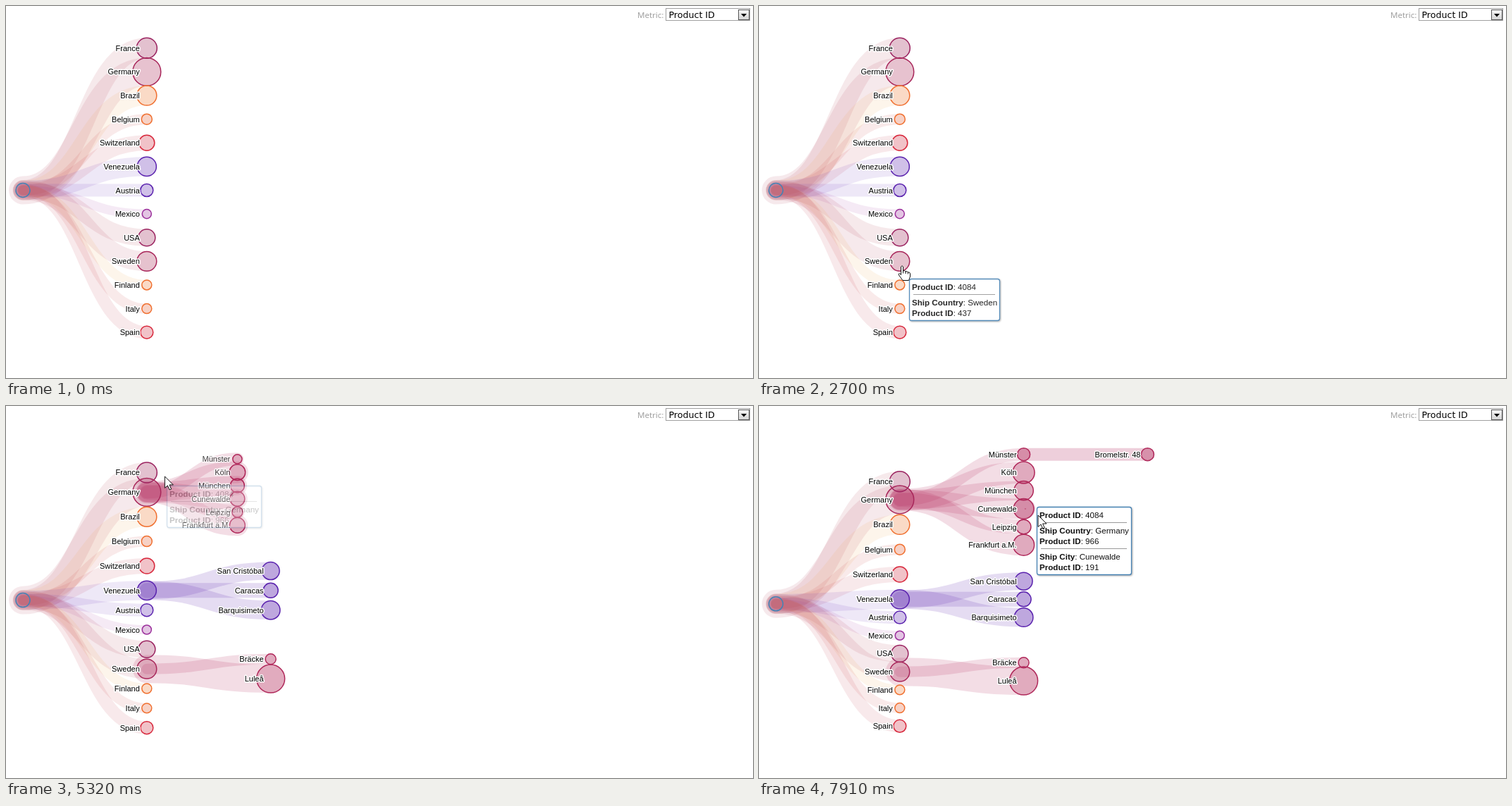
These frames come from a looping animation (1060 px wide and 528 px high, 8000 ms). An HTML page:

```html
<!DOCTYPE html>
<html lang="en">
<head>
<meta charset="utf-8">
<title>Weighted tree</title>
<style>
html, body { margin: 0; width: 100%; height: 100%; overflow: hidden; background: #fff; }
svg { display: block; }
.label { font: 11px "Liberation Sans", Arial, sans-serif; text-anchor: end;
  paint-order: stroke; stroke: #fff; stroke-width: 3px; stroke-linejoin: round; }
.tip text { font: 11.6px "Liberation Sans", Arial, sans-serif; fill: #111; }
.tip tspan { font-weight: bold; }
.tip rect { fill: #fff; stroke: #4682b4; stroke-width: 1.3; filter: drop-shadow(1px 1px 1px #0005); }
.cursor path { fill: #fff; stroke: #111; stroke-linejoin: round; }
</style>
</head>
<body>
<svg width="1060" height="528" viewBox="0 0 1060 528">
  <defs>
    <linearGradient id="button" x2="0" y2="1">
      <stop stop-color="#f6f6f6"/><stop offset="1" stop-color="#d4d4d4"/>
    </linearGradient>
  </defs>
  <text x="896" y="17" font-family="Open Sans, sans-serif" font-size="11.6" fill="#999">Metric:</text>
  <rect x="936.5" y="3.5" width="119" height="17" fill="#fff" stroke="#a0a0a0"/>
  <text x="940.5" y="17" font-family="DejaVu Sans, sans-serif" font-size="12.6">Product ID</text>
  <rect x="1039.5" y="5.5" width="15" height="14" fill="url(#button)" stroke="#555"/>
  <path d="M1043 11h8l-4 4.5z"/>
  <g id="stage"></g>
</svg>
<script>
const LOOP = 8000, GROW = 450, COLUMN = 175.8, TOP = 43, HEIGHT = 437;
const OPEN = { Sweden: 3080, Venezuela: 3950, Germany: 5054, Münster: 6544, Cunewalde: 7845 };
const LINK_ALPHA = [0, .1, .155, .22], FILL_ALPHA = [0, .2, .28, .37];

// node and link colours
const COLORS = {
  wine: ['#9b2360', '#a8283c'], plum: ['#a8265a', '#a82848'], rose: ['#b0285a', '#b0285a'],
  amber: ['#f07030', '#e8a040'], rust: ['#f07030', '#c03038'], red: ['#d8283c', '#b8283c'],
  violet: ['#5a22ae', '#5a22ae'], orchid: ['#9c309c', '#9c309c'],
};
const COUNTRIES = `France 478 wine, Germany 966 plum, Brazil 442 amber, Belgium 100 rust,
  Switzerland 254 red, Venezuela 410 violet, Austria 157 violet, Mexico 70 orchid, USA 311 wine,
  Sweden 437 plum, Finland 83 amber, Italy 83 rust, Spain 157 red`;
const BRANCHES = {
  Germany: `Münster 65 rose, Köln 228 rose, München 173 rose, Cunewalde 191 rose, Leipzig 90 rose,
    Frankfurt a.M. 212 rose`,
  Venezuela: 'San Cristóbal 140 violet, Caracas 94 violet, Barquisimeto 162 violet',
  Sweden: 'Bräcke 41 rose, Luleå 400 rose',
  Münster: 'Bromelstr. 48 65 rose',
  Cunewalde: 'Murnweg 12 191 rose',
};

const root = { name: '', depth: 0, r: 10, color: '#4682b4', kids: [] };
const nodes = [root];

function grow(parent, list) {
  for (const item of list.split(',')) {
    const [, name, value, tone] = item.trim().match(/(.+) (\d+) (\w+)/);
    const depth = parent.depth + 1;
    const r = 1.6 + (depth < 2 ? .59 : .92) * Math.sqrt(value);
    const [color, linkColor] = COLORS[tone];
    const node = { parent, name, value, depth, r, color, linkColor, kids: [] };
    parent.kids.push(node);
    nodes.push(node);
  }
  for (const kid of parent.kids) if (BRANCHES[kid.name]) grow(kid, BRANCHES[kid.name]);
}
grow(root, COUNTRIES);

// Tidy tree: siblings one unit apart, cousins two; room for wide branches is shared out evenly.
function layout(key, isOpen) {
  const countries = root.kids;
  const visible = nodes.filter(n => n.depth === 1 || n.depth > 1 && isOpen(n.parent));
  countries.forEach((c, i) => c.slot = i);
  const open = countries.filter(c => c.kids.length && isOpen(c));
  open.slice(1).forEach((b, k) => {
    const a = open[k], first = countries.indexOf(a), count = countries.indexOf(b) - first;
    const extra = Math.max(0, (a.kids.length + b.kids.length) / 2 + 1 - (b.slot - a.slot));
    countries.forEach((c, i) => { if (i > first) c.slot += extra * Math.min(1, (i - first) / count); });
  });
  for (const n of visible) if (n.depth > 1) {
    const { slot, kids } = n.parent;
    n.slot = slot + kids.indexOf(n) - (kids.length - 1) / 2;
  }
  const sorted = [...visible].sort((a, b) => a.slot - b.slot);
  const low = sorted[0], high = sorted.at(-1);
  const gap = low.parent === high.parent ? 1 : 2;
  const step = HEIGHT / (high.slot - low.slot + gap);
  for (const n of visible) n[key] = TOP + step * (n.slot - low.slot + gap / 2);
  root[key] = (countries[0][key] + countries.at(-1)[key]) / 2;
}
layout('from', n => n.name === 'Venezuela' || n.name === 'Sweden');
layout('to', () => true);
for (const n of nodes) n.from ??= n.to;

const clamp = v => Math.max(0, Math.min(1, v));
const mix = (a, b, p) => a + (b - a) * p;
const ease = p => p < .5 ? 4 * p ** 3 : 1 - 4 * (1 - p) ** 3;
const grown = (name, t) => ease(clamp((t - OPEN[name]) / GROW));

function place(node, t) {
  const { parent, depth } = node;
  node.shown = depth < 2 || t > OPEN[parent.name];
  node.grow = depth < 2 ? 1 : grown(parent.name, t);
  node.x = depth ? 24 + COLUMN * (depth - 1 + node.grow) : 24;
  if (depth === 1) node.x = 24 + COLUMN;
  node.y = mix(node.from, node.to, grown('Germany', t));
  if (depth > 1) node.y = mix(parent.from, node.y, node.grow);
}

// time, x, y and, while a link is hovered, the node it leads to
const ROUTE = [
  [520, 207, 528], [820, 206, 472], [1030, 202, 466], [1170, 202, 466], [1650, 202, 430],
  [1800, 202, 430], [2530, 203, 376], [2700, 203, 369], [3260, 203, 369], [3400, 221, 342],
  [3600, 222, 248], [3730, 214, 229], [4080, 214, 229], [4300, 228, 180], [4620, 223, 118],
  [4770, 216, 98], [5090, 216, 98], [5320, 225, 100], [5640, 328, 69, 'Münster'], [5950, 330, 67],
  [6050, 386, 52], [6140, 380, 73], [6720, 380, 74], [7000, 404, 96], [7280, 398, 122],
  [7360, 384, 133], [7560, 385, 140], [7880, 388, 146], [7910, 396, 155],
];

function cursorAt(t) {
  const next = ROUTE.findIndex(([time]) => time > t);
  const i = next < 0 ? ROUTE.length - 1 : Math.max(1, next);
  const [t0, x0, y0, link] = ROUTE[i - 1], [t1, x1, y1] = ROUTE[i];
  const p = clamp((t - t0) / (t1 - t0));
  return { x: mix(x0, x1, p), y: mix(y0, y1, p), link };
}

const nodeUnder = ({ x, y }) => nodes.find(n =>
  n.shown && n.depth && n.grow > .5 && Math.hypot(n.x - x, n.y - y) < n.r * n.grow + 1);

// A tip opens beside the point where the cursor enters a node.
const pen = document.createElement('canvas').getContext('2d');
const tips = [];
function textWidth(text, weight) {
  pen.font = weight + ' 11.6px "Liberation Sans", Arial, sans-serif';
  return pen.measureText(text).width;
}
function addTip(node, { x, y }, start) {
  const path = node.depth > 1 ? [node.parent, node] : [node];
  const levels = path.map(n => ['Ship ' + (n.depth > 1 ? 'City' : 'Country'), n.name, n.value]);
  const width = Math.max(...levels.map(([key, name]) => textWidth(key, 'bold') + textWidth(': ' + name, 'normal')));
  tips.push({ x: Math.round(x + 10), y: Math.round(y + 10), w: Math.round(width + 8), start, end: Infinity, levels });
}
for (let t = ROUTE[0][0], last; t < LOOP; t += 10) {
  nodes.forEach(n => place(n, t));
  const cursor = cursorAt(t);
  const target = nodes.find(n => n.name && n.name === cursor.link) || nodeUnder(cursor);
  if (target !== last) {
    if (last) tips.at(-1).end = t;
    if (target) addTip(target, cursor, t);
    last = target;
  }
}

function linkSvg({ parent, x, y, r, depth, linkColor }) {
  const mid = (parent.x + x) / 2;
  return `<path d="M${parent.x} ${parent.y}C${mid} ${parent.y} ${mid} ${y} ${x} ${y}" fill="none"
    stroke="${linkColor}" stroke-width="${2 * r}" stroke-linecap="round" opacity="${LINK_ALPHA[depth]}"/>`;
}

function nodeSvg({ name, x, y, r, grow, depth, color }) {
  return `<circle cx="${x}" cy="${y}" r="${r * grow}" fill="${color}" fill-opacity="${FILL_ALPHA[depth]}"
    stroke="${color}" stroke-width="1.5"/>
    <text class="label" x="${x - 10}" y="${y + 4}" opacity="${grow}">${name}</text>`;
}

function tipSvg({ x, y, w, start, end, levels }, t) {
  const alpha = Math.min(clamp((t - start) / 200), clamp((end + 120 - t) / 80));
  if (!alpha) return '';
  const line = (key, value, dy) => `<text x="4" y="${dy}"><tspan>${key}</tspan>: ${value}</text>`;
  const body = levels.map(([key, name, value], i) => {
    const top = 22.5 + 37 * i;
    return `<path d="M6 ${top}H${w - 7}" stroke="#999"/>` +
      line(key, name, top + 15.5) + line('Product ID', value, top + 30.5);
  });
  return `<g class="tip" transform="translate(${x} ${y})" opacity="${alpha}">
    <rect x=".5" y=".5" width="${w - 1}" height="${22 + 37 * levels.length}" rx="3"/>
    ${line('Product ID', 4084, 16)}${body.join('')}</g>`;
}

const ARROW = '<path d="M0 0V16.5L4 13L6.7 19L9.3 18L6.6 12H12Z"/>';
const HAND = `<path d="M-1.5 1Q0-1.5 1.5 1V7Q4 5.5 5 8Q7.5 6.5 8.3 9Q11 8 11.5 11V15L9.5 20.5H1
  L-4.5 13Q-5.5 10.5-3.5 10.5L-1.5 12.5Z"/><path d="M1.5 7V10.5M5 8V11M8.3 9V11.5"/>`;

function cursorSvg(t) {
  if (t < ROUTE[0][0]) return '';
  const cursor = cursorAt(t);
  return `<g class="cursor" transform="translate(${cursor.x} ${cursor.y})">${nodeUnder(cursor) ? HAND : ARROW}</g>`;
}

const stage = document.getElementById('stage');
function draw(now) {
  const t = now % LOOP;
  nodes.forEach(n => place(n, t));
  const shown = nodes.filter(n => n.shown);
  stage.innerHTML = shown.slice(1).map(linkSvg).join('') + shown.map(nodeSvg).join('') +
    tips.map(tip => tipSvg(tip, t)).join('') + cursorSvg(t);
  requestAnimationFrame(draw);
}
draw(performance.now());
</script>
</body>
</html>
```
